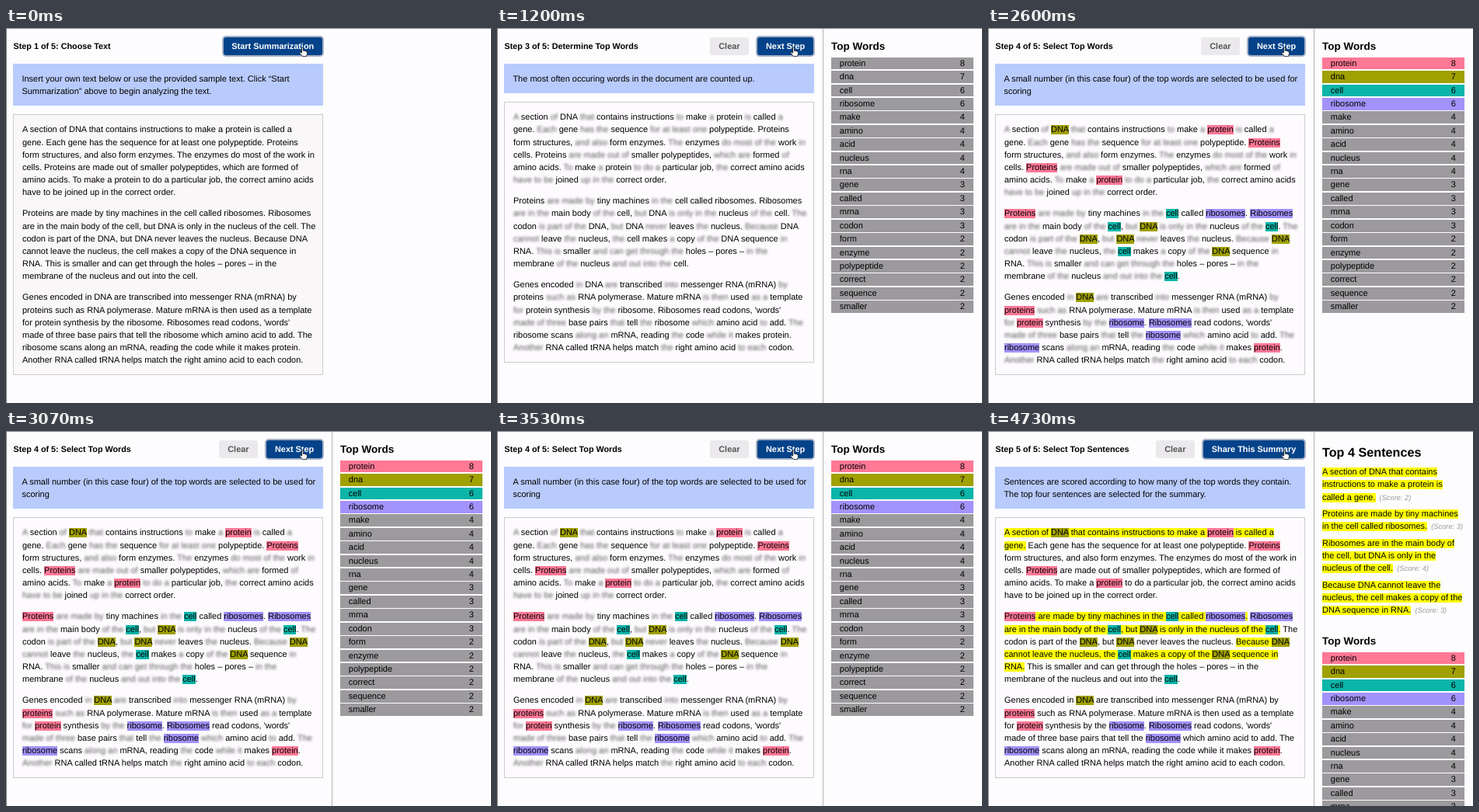
Recreate the animation shown at these times as an HTML page. Size 624 by 483 pixels, loop 4.79 s.

```html
<!DOCTYPE html>
<html lang="en">
<head>
<meta charset="utf-8">
<title>Text summarization in five steps</title>
<style>
  html, body { margin: 0; width: 100%; height: 100%; overflow: hidden; background: #fdfcfe; }
  #stage { position: relative; width: 624px; height: 483px; overflow: hidden; box-sizing: border-box;
    border: solid #858388; border-width: 1px 0 0 1px; color: #000;
    font: 11px/16.2px "Liberation Sans", Arial, sans-serif; text-rendering: geometricPrecision; }
  #stage > * { position: absolute; }
  p, h1, h2 { margin: 0; white-space: pre; }
  h1 { left: 8.5px; top: 15.2px; font-size: 10.8px; line-height: 16.2px; }
  #buttons { right: 217px; top: 11px; display: flex; gap: 11.4px; }
  b { padding: 0 11.3px; border-radius: 3px; background: #ebe9ec; color: #555; font-size: 10.9px;
    height: 23px; line-height: 24px; }
  b.main { padding: 0 10.8px; background: #04438a; color: #fff; box-shadow: 0 0 0 2px #a5b1c5; }
  #left { left: 8.4px; top: 45.4px; width: 398.6px; }
  #banner { padding: 11.2px 11px 10.4px; background: #b9cbfd; }
  #text { box-sizing: border-box; margin-top: 10.8px; padding: 11.2px 10.6px; border: 1px solid #cdcbce;
    background: #fdfbfd; height: 336px; }
  #text p + p { margin-top: 10.8px; }
  .s1 #text { background: #f9f7f8; }
  #side { display: none; left: 418px; top: 0; width: 205px; height: 483px; border-left: 1px solid #b5b3b7; }
  .s3 #side, .s4 #side, .s5 #side { display: block; }
  #side > * { margin-left: 10px; }
  h2 { font-size: 13.5px; line-height: 18px; }
  #words h2 { padding: 13.6px 0 5.1px; }
  #summary { display: none; }
  .s5 #summary { display: block; height: 247px; }
  #summary h2 { font-size: 16.2px; padding: 17.6px 0 8.6px; }
  #summary p { margin-bottom: 5.4px; }
  small { margin-left: 2px; font-size: 9.3px; font-style: italic; color: #999; }
  .row { display: flex; justify-content: space-between; width: 161px; padding: 0 10.8px;
    height: 15.8px; line-height: 17px; margin-bottom: 1.63px; background: #9c9a9d; }
  u { text-decoration: none; }
  #summary u, .s5 u { background: #ff0; }
  i { font-style: normal; }
  .s2 i, .s3 i, .s4 i { color: transparent; text-shadow: 0 0 3px rgba(0, 0, 0, .65); }
  :is(.s4, .s5) .protein { background: #ff7896; }
  :is(.s4, .s5) .dna { background: #a0a000; }
  :is(.s4, .s5) .cell { background: #0bb5a8; }
  :is(.s4, .s5) .ribosome { background: #a292fb; }
  svg { left: 376px; top: 22.5px; }
</style>
</head>
<body>
<div id="stage">
  <h1></h1>
  <div id="buttons"></div>
  <div id="left"><p id="banner"></p><div id="text"></div></div>
  <div id="side"><div id="summary"></div><div id="words"></div></div>
  <svg width="11.7" height="13.5" viewBox="0 0 13 15">
    <path d="M4 9V2Q4 .8 5 .8T6 2V6Q7.2 5 8 6.4Q9.2 5.6 9.9 7Q11.6 6.4 11.6 8.2V10.6L10.4 14H5.2L1.2 9.6Q.6 8 2 7.8Z"
      fill="#fff" stroke="#111" stroke-width=".9"/>
  </svg>
</div>
<script>
const LOOP = 4790;
const $ = id => document.getElementById(id);

const steps = [
  { at: 0, title: 'Choose Text', action: 'Start Summarization',
    note: 'Insert your own text below or use the provided sample text. Click “Start\nSummarization” above to begin analyzing the text.' },
  { at: 530, title: 'Ignore Stopwords', action: 'Next Step',
    note: 'First, common words (known as stopwords) are ignored.' },
  { at: 1070, title: 'Determine Top Words', action: 'Next Step',
    note: 'The most often occuring words in the document are counted up.' },
  { at: 2200, title: 'Select Top Words', action: 'Next Step',
    note: 'A small number (in this case four) of the top words are selected to be used for\nscoring' },
  { at: 3730, title: 'Select Top Sentences', action: 'Share This Summary',
    note: 'Sentences are scored according to how many of the top words they contain.\nThe top four sentences are selected for the summary.' }
];

// Square brackets enclose the sentences chosen for the summary.
const text = `[A section of DNA that contains instructions to make a protein is called a
gene.] Each gene has the sequence for at least one polypeptide. Proteins
form structures, and also form enzymes. The enzymes do most of the work in
cells. Proteins are made out of smaller polypeptides, which are formed of
amino acids. To make a protein to do a particular job, the correct amino acids
have to be joined up in the correct order.

[Proteins are made by tiny machines in the cell called ribosomes.] [Ribosomes
are in the main body of the cell, but DNA is only in the nucleus of the cell.] The
codon is part of the DNA, but DNA never leaves the nucleus. [Because DNA
cannot leave the nucleus, the cell makes a copy of the DNA sequence in
RNA.] This is smaller and can get through the holes – pores – in the
membrane of the nucleus and out into the cell.

Genes encoded in DNA are transcribed into messenger RNA (mRNA) by
proteins such as RNA polymerase. Mature mRNA is then used as a template
for protein synthesis by the ribosome. Ribosomes read codons, 'words'
made of three base pairs that tell the ribosome which amino acid to add. The
ribosome scans along an mRNA, reading the code while it makes protein.
Another RNA called tRNA helps match the right amino acid to each codon.`;

const stopwords = new Set(('a of that to is each has the for at least one and also do most in are made out ' +
  'which up have be by but only part never because cannot this can get through into such as then three ' +
  'while along an it another').split(' '));

const counts = 'protein 8,dna 7,cell 6,ribosome 6,make 4,amino 4,acid 4,nucleus 4,rna 4,gene 3,called 3,' +
  'mrna 3,codon 3,form 2,enzyme 2,polypeptide 2,correct 2,sequence 2,smaller 2';

const summary = [
  ['A section of DNA that contains\ninstructions to make a protein is\ncalled a gene.', 2],
  ['Proteins are made by tiny machines\nin the cell called ribosomes.', 3],
  ['Ribosomes are in the main body of\nthe cell, but DNA is only in the\nnucleus of the cell.', 4],
  ['Because DNA cannot leave the\nnucleus, the cell makes a copy of the\nDNA sequence in RNA.', 3]
];

function markWord(word) {
  const lower = word.toLowerCase();
  if (stopwords.has(lower)) return `<i>${word}</i>`;
  const top = lower.match(/^(protein|ribosome)s?$|^(dna|cell)$/);
  return top ? `<span class="${top[1] || top[2]}">${word}</span>` : word;
}

$('text').innerHTML = text.split('\n\n').map(par =>
  `<p>${par.replace(/\w+/g, markWord).replace(/\[/g, '<u>').replace(/]/g, '</u>')}</p>`).join('');
$('summary').innerHTML = '<h2>Top 4 Sentences</h2>' + summary.map(([sentence, score]) =>
  `<p><u>${sentence}</u> <small>(Score: ${score})</small></p>`).join('');
$('words').innerHTML = '<h2>Top Words</h2>' + counts.split(',').map(entry => {
  const [word, count] = entry.split(' ');
  return `<div class="row ${word}"><span>${word}</span><span>${count}</span></div>`;
}).join('');

let shown = 0;
function show(number) {
  const { title, action, note } = steps[number - 1];
  shown = number;
  $('stage').className = 's' + number;
  document.querySelector('h1').textContent = `Step ${number} of 5: ${title}`;
  $('banner').textContent = note;
  $('buttons').innerHTML = (number > 1 ? '<b>Clear</b>' : '') + `<b class="main">${action}</b>`;
}

function tick() {
  const time = performance.now() % LOOP;
  const number = steps.filter(step => step.at <= time).length;
  if (number !== shown) show(number);
  requestAnimationFrame(tick);
}
tick();
</script>
</body>
</html>
```
